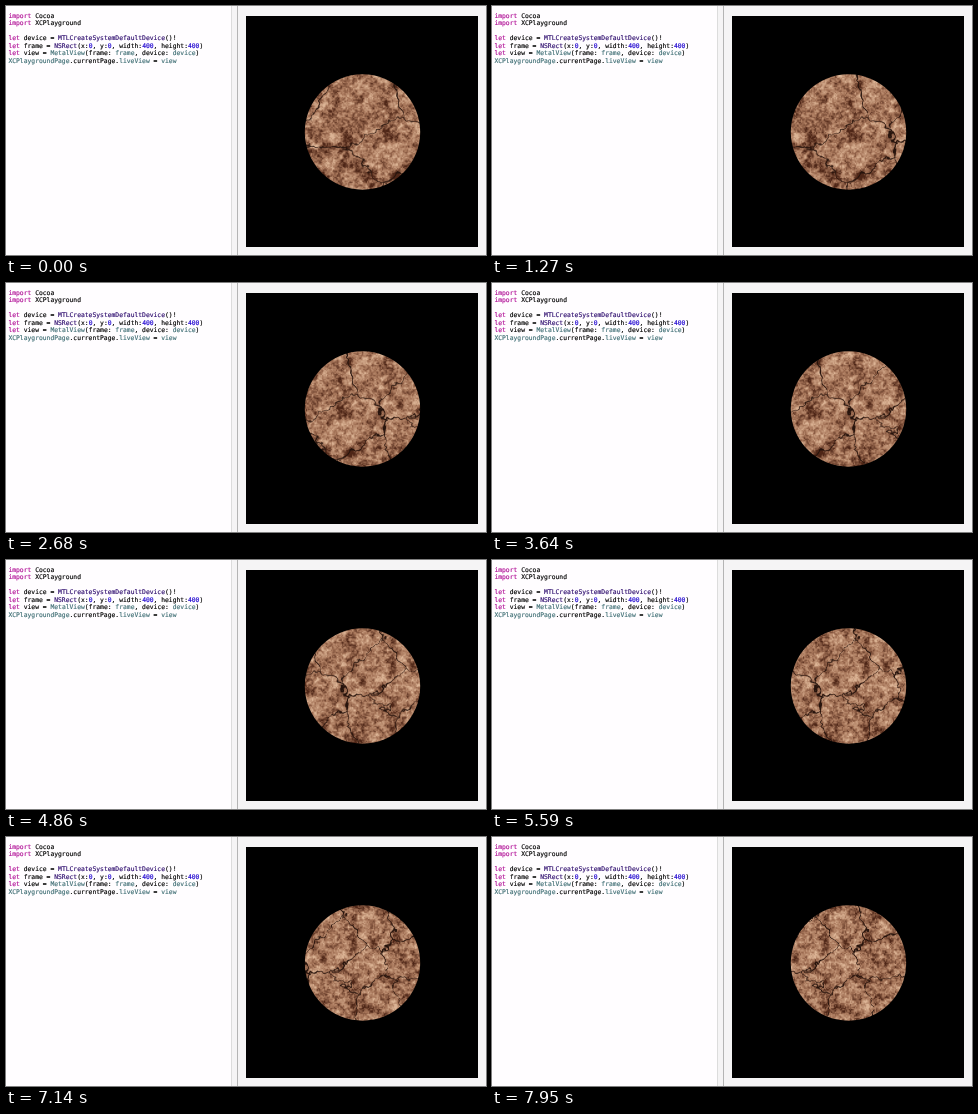
Recreate the animation shown at these times as an HTML page with a canvas. Size 480 by 249 pixels, loop 8000 ms.

```html
<!DOCTYPE html>
<html lang="en">
<head>
<meta charset="utf-8">
<title>Rotating planet playground</title>
<style>
html, body { margin: 0; width: 100%; height: 100%; overflow: hidden; background: #f5f4f5; }
#editor {
  position: absolute; left: 0; top: 0; width: 225px; height: 100%;
  background: #fffdff; border-right: 1px solid #dcdcdc;
}
#divider { position: absolute; left: 231px; top: 0; width: 1px; height: 100%; background: #b4b4b4; }
pre {
  margin: 0; position: absolute; left: 2.4px; top: 6.7px; color: #000;
  font: 6.35px/7.5px "DejaVu Sans Mono", monospace; text-rendering: geometricPrecision;
  -webkit-text-stroke: .15px;
}
.k { color: #b00d95; }
.n { color: #1c00cf; }
.f { color: #2e0d6e; }
.t { color: #3f6e74; }
canvas { position: absolute; left: 240px; top: 10px; background: #000; }
</style>
</head>
<body>
<div id="editor"><pre><span class="k">import</span> Cocoa
<span class="k">import</span> XCPlayground

<span class="k">let</span> device = <span class="f">MTLCreateSystemDefaultDevice</span>()!
<span class="k">let</span> frame = <span class="f">NSRect</span>(x:<span class="n">0</span>, y:<span class="n">0</span>, width:<span class="n">400</span>, height:<span class="n">400</span>)
<span class="k">let</span> view = <span class="t">MetalView</span>(frame: <span class="t">frame</span>, device: <span class="t">device</span>)
<span class="t">XCPlaygroundPage</span>.currentPage.<span class="t">liveView</span> = <span class="t">view</span></pre></div>
<div id="divider"></div>
<canvas id="stage" width="232" height="231"></canvas>
<script>
const LOOP = 8000, SPEED = 17.2 / 1000;      // ms, px per ms
const RADIUS = 57.7, CENTER_X = 116.5, CENTER_Y = 116;
const LEFT = 296, TOP = 67, WIDTH = 260, HEIGHT = 119;   // rock area in page coordinates
const DETAIL = 2;                            // rock pixels per stage pixel

// Centres of the dried-mud plates; cracks run halfway between neighbours.
const plates = [
  [286, 60], [356, 104], [383, 146], [426, 83], [348, 186], [404, 186], [456, 112], [474, 136],
  [492, 84], [520, 76], [530, 124], [456, 162], [494, 166], [533, 160],
];

function hash(x, y) {
  let h = Math.imul(x, 374761393) + Math.imul(y, 668265263) | 0;
  h = Math.imul(h ^ h >>> 13, 1274126177);
  return ((h ^ h >>> 16) >>> 0) / 4294967296;
}
const mix = (a, b, k) => a + (b - a) * k;
const clamp = v => Math.min(1, Math.max(0, v));
const ease = k => k * k * (3 - 2 * k);

function noise(x, y) {
  const ix = Math.floor(x), iy = Math.floor(y), u = ease(x - ix), v = ease(y - iy);
  return mix(mix(hash(ix, iy), hash(ix + 1, iy), u),
             mix(hash(ix, iy + 1), hash(ix + 1, iy + 1), u), v);
}

// Weighted octaves of noise around zero, each half the size of the one before
function grain(x, y, size, octaves, fade) {
  let sum = 0, weight = 1;
  for (let i = 0; i < octaves; i++, size /= 2, weight *= fade)
    sum += (noise(x / size + i * 31, y / size + i * 17) - .5) * weight;
  return sum;
}

// How much of a crack covers this point, 0 to 1
function crack(x, y) {
  const wx = x + 7 * grain(x, y, 9, 3, .6), wy = y + 7 * grain(x + 500, y, 9, 3, .6);
  const squared = ([px, py]) => (px - wx) ** 2 + (py - wy) ** 2;
  const [a, b] = [...plates].sort((p, q) => squared(p) - squared(q));
  const gap = (squared(b) - squared(a)) / (2 * Math.hypot(a[0] - b[0], a[1] - b[1]));
  const halfWidth = .25 + .7 * noise(x / 14, y / 14 + 90);
  return clamp(halfWidth + .5 - gap);
}

function rockTone(x, y) {
  const stained = clamp((450 - x) / 60) * clamp((y - 95) / 60);
  const patches = clamp(noise(x / 13 + 5, y / 13) * 2 - .7);
  return clamp(.54 + grain(x, y, 10, 4, 1) * .46 - patches * (.1 + .22 * stained));
}

function makeRock() {
  const rock = document.createElement('canvas');
  rock.width = WIDTH * DETAIL;
  rock.height = HEIGHT * DETAIL;
  const ctx = rock.getContext('2d');
  const image = ctx.createImageData(rock.width, rock.height);
  const dark = [78, 38, 23], base = [166, 117, 89], light = [220, 180, 149], gapColor = [38, 19, 12];
  for (let row = 0; row < rock.height; row++) for (let col = 0; col < rock.width; col++) {
    const x = LEFT + col / DETAIL, y = TOP + row / DETAIL;
    const tone = rockTone(x, y), cover = crack(x, y);
    const i = (row * rock.width + col) * 4;
    for (let c = 0; c < 3; c++) {
      const color = tone < .5 ? mix(dark[c], base[c], tone * 2) : mix(base[c], light[c], tone * 2 - 1);
      image.data[i + c] = mix(color, gapColor[c], cover);
    }
    image.data[i + 3] = 255;
  }
  ctx.putImageData(image, 0, 0);
  return rock;
}

const stage = document.getElementById('stage').getContext('2d');
const rock = makeRock();

function draw() {
  const shift = performance.now() % LOOP * SPEED;
  stage.clearRect(0, 0, 232, 231);
  stage.save();
  stage.beginPath();
  stage.arc(CENTER_X, CENTER_Y, RADIUS, 0, Math.PI * 2);
  stage.clip();
  stage.drawImage(rock, LEFT - 240 - shift, TOP - 10, WIDTH, HEIGHT);
  stage.restore();
  requestAnimationFrame(draw);
}
draw();
</script>
</body>
</html>
```
